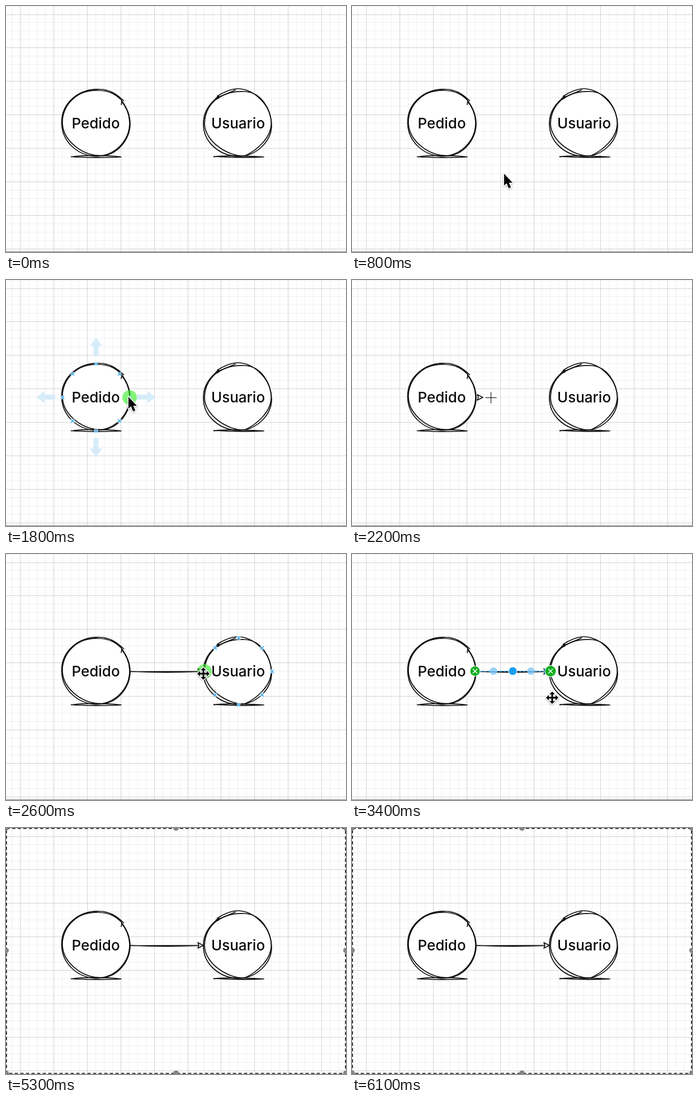
These frames come from a looping animation (608 px wide and 440 px high, 6500 ms). An HTML page with a canvas:

```html
<!DOCTYPE html>
<html lang="es">
<head>
<meta charset="utf-8">
<title>Pedido y usuario</title>
<style>
html, body { margin: 0; width: 100%; height: 100%; overflow: hidden; background: #fff; }
canvas { display: block; }
</style>
</head>
<body>
<canvas id="stage" width="608" height="440"></canvas>
<script>
const ctx = document.getElementById('stage').getContext('2d');
const LOOP = 6500, STEP = 100, TAU = Math.PI * 2;
const INK = '#0c0c0c', BLUE = '#29a3ec';

const nodes = [
  { x: 161, label: 'Pedido', textX: 160.5, paths: [
    'M211 170C197 157 184 149 168 149C132 147 99 172 99.500 209C100 243 128 267 160 269C196 268 222 240 221 207C220 190 214 179 206 170',
    'M206 177L207 170L211 175M207 169C199 161 188 151 164 151C126 150 104 176 101 203C98 238 133 266 168 268C200 268 221 238 222 212C222 194 216 182 206 168',
    'M116 270C140 266 180 267 206 270C180 271.500 140 271.500 116 269.500' ] },
  { x: 416, label: 'Usuario', textX: 415, paths: [
    'M376 167C390 157 404 152 427 153C456 154 474 184 475 213C475 242 448 268 417 269C384 269 352 245 353 209C353 190 364 174 381 161',
    'M375 164L381 165M377 162C388 154 404 148 414 148C440 148 470 172 474 204C478 236 445 260 427 268C398 270 356 243 355 211C355 188 366 174 380 163L411 150',
    'M371 270C385 267 420 268 461 270C430 271.500 400 271 371 269' ] }
].map(n => ({ ...n, paths: n.paths.map(p => new Path2D(p)) }));

const pointer = new Path2D('M0 0V21L4.600 17L8.200 26L12.200 24.200L8.600 16H15Z');
const hint = new Path2D('M73 -4.500H92V-11L106.500 0L92 11V4.500H73Z');
const mover = new Path2D();
for (let i = 0; i < 4; i++) {
  const arm = new Path2D('M-1.500 0V-6H-5L0 -11L5 -6H1.500V0Z');
  mover.addPath(arm, new DOMMatrix().rotate(i * 90));
}

function stroke(path, color = INK, width = 1.7) {
  ctx.strokeStyle = color;
  ctx.lineWidth = width;
  ctx.stroke(path);
}

function line(x1, y1, x2, y2, color, width) {
  stroke(new Path2D(`M${x1} ${y1}L${x2} ${y2}`), color, width);
}

function disc(x, y, r, color) {
  ctx.fillStyle = color;
  ctx.beginPath();
  ctx.arc(x, y, r, 0, TAU);
  ctx.fill();
}

function cross(x, y, r, color, width) {
  line(x - r, y - r, x + r, y + r, color, width);
  line(x - r, y + r, x + r, y - r, color, width);
}

// Places the origin at (x, y) for one drawing.
function at(x, y, draw) {
  ctx.save();
  ctx.translate(x, y);
  draw();
  ctx.restore();
}

// Position along keyed points [time, x, y].
function along(keys, t) {
  let i = 0;
  while (i < keys.length - 2 && t >= keys[i + 1][0]) i++;
  const [a, b] = [keys[i], keys[i + 1]];
  const k = Math.min(1, Math.max(0, (t - a[0]) / (b[0] - a[0])));
  return [a[1] + (b[1] - a[1]) * k, a[2] + (b[2] - a[2]) * k];
}

function drawGrid() {
  ctx.fillStyle = '#fff';
  ctx.fillRect(0, 0, 608, 440);
  const rule = (pitch, color) => {
    ctx.fillStyle = color;
    for (let x = 25.2 % pitch; x < 608; x += pitch) ctx.fillRect(Math.floor(x), 0, 1, 440);
    for (let y = 15 % pitch; y < 440; y += pitch) ctx.fillRect(0, Math.floor(y), 608, 1);
  };
  rule(59.96 / 4, '#efefef');
  rule(59.96, '#d2d2d2');
  ctx.fillStyle = '#929292';
  ctx.fillRect(0, 438.5, 608, 1.2);
}

function drawNode(n) {
  disc(n.x + 0.5, 209, 59.5, '#fff');
  n.paths.forEach(p => stroke(p));
  ctx.font = '500 26px Inter, "Open Sans", sans-serif';
  ctx.textAlign = 'center';
  ctx.fillStyle = INK;
  ctx.fillText(n.label, n.textX, 219);
}

function drawEdge(tip) {
  const end = tip - 9;
  if (end > 230) {
    stroke(new Path2D(`M222 210.500L${end} 210M222 210Q${(222 + end) / 2} 213 ${end} 210.500`), INK, 1.5);
  }
  const head = new Path2D(`M${end - 1} 205L${tip} 210L${end - 1} 215L${end + 1} 210Z`);
  ctx.fillStyle = '#fff';
  ctx.fill(head);
  stroke(head, INK, 1.6);
}

function drawAnchors(x) {
  for (let i = 0; i < 8; i++) {
    const r = i % 2 ? 59.4 : 60;
    const px = x + r * Math.cos(i * TAU / 8), py = 210 + r * Math.sin(i * TAU / 8);
    cross(px, py, 3, '#fff', 3);
    cross(px, py, 3, BLUE, 1.4);
  }
}

function drawHints() {
  for (let i = 0; i < 4; i++) at(161, 209.5, () => {
    ctx.rotate(i * TAU / 4);
    ctx.fillStyle = '#d6ecf9';
    ctx.fill(hint);
  });
}

function drawSelection() {
  ctx.setLineDash([4, 3]);
  line(222, 210, 345, 210, BLUE, 1.3);
  stroke(new Path2D('M344 205L353 210L344 215Z'), BLUE, 1.3);
  ctx.setLineDash([]);
  disc(253, 209.5, 6.8, 'rgba(130,200,245,.8)');
  disc(320, 209.5, 6.8, 'rgba(130,200,245,.8)');
  disc(287.5, 209.5, 8, '#fff');
  disc(287.5, 209.5, 7, '#1b9ff0');
  for (const [x, r] of [[220, 8.5], [355, 9.5]]) {
    disc(x, 209.5, r + 1, '#fff');
    disc(x, 209.5, r, '#0fae20');
    cross(x, 209.5, 4, '#fff', 1.4);
  }
}

const glow = (x, y) => disc(x, y, 13, 'rgba(55,235,40,.62)');

function drawCursor(path, x, y) {
  at(x, y, () => {
    ctx.shadowColor = 'rgba(0,0,0,.35)';
    ctx.shadowBlur = 3;
    ctx.shadowOffsetY = 1;
    stroke(path, '#fff', 3);
    ctx.shadowColor = 'transparent';
    ctx.fillStyle = '#000';
    ctx.fill(path);
  });
}

function drawFrame() {
  ctx.setLineDash([6, 4]);
  ctx.strokeStyle = '#fff';
  ctx.lineWidth = 2;
  ctx.setLineDash([]);
  ctx.strokeRect(1, 1, 606, 438);
  ctx.setLineDash([6, 4]);
  ctx.strokeStyle = '#111';
  ctx.lineWidth = 1.6;
  ctx.strokeRect(0.8, 0.8, 606.4, 437.9);
  ctx.setLineDash([]);
  for (const x of [0, 304, 608]) {
    for (const y of [0, 219, 438.5]) {
      if (x !== 304 || y !== 219) disc(x, y, 5, '#858585');
    }
  }
}

const approach = [[500, 318, 424], [800, 272, 300], [1000, 225, 222], [1100, 219, 206],
  [1200, 220, 207], [1600, 220, 207], [1800, 219, 209]];
const drag = [[2000, 224, 210], [2200, 248, 210], [2400, 306, 211], [2600, 353, 214], [2800, 354, 214]];
const leave = [[3000, 354, 215], [3200, 357, 246], [3400, 358, 257], [3500, 360, 404]];

function render(t) {
  drawGrid();
  nodes.forEach(drawNode);

  if (t >= 500 && t < 2000) {
    const [x, y] = along(approach, t);
    if (t >= 1000) {
      drawHints();
      drawAnchors(161);
      if (t >= 1100) glow(221, 210);
      cross(221, 210, 3, '#c9f3ff', 1.4);
    }
    drawCursor(pointer, x, y);
  } else if (t >= 2000 && t < 3000) {
    const [x, y] = along(drag, t);
    const snapped = t >= 2600;
    if (t >= 2200) drawEdge(snapped ? 353 : x - 14);
    if (snapped) {
      drawAnchors(416);
      glow(355, 210);
      drawCursor(mover, x, y);
    } else {
      const cx = Math.floor(x) + 0.5, cy = Math.floor(y) + 0.5;
      line(cx - 10, cy, cx + 10, cy, '#222', 1.2);
      line(cx, cy - 10, cx, cy + 10, '#222', 1.2);
    }
  } else if (t >= 3000) {
    drawEdge(353);
    if (t < 4000) drawSelection();
    if (t < 3600) drawCursor(mover, ...along(leave, t));
    if (t >= 5300) drawFrame();
  }
}

ctx.lineCap = 'butt';
ctx.lineJoin = 'round';
const start = performance.now();

function tick() {
  const t = (performance.now() - start) % LOOP;
  render(Math.floor(t / STEP) * STEP);
  requestAnimationFrame(tick);
}
tick();
</script>
</body>
</html>
```
